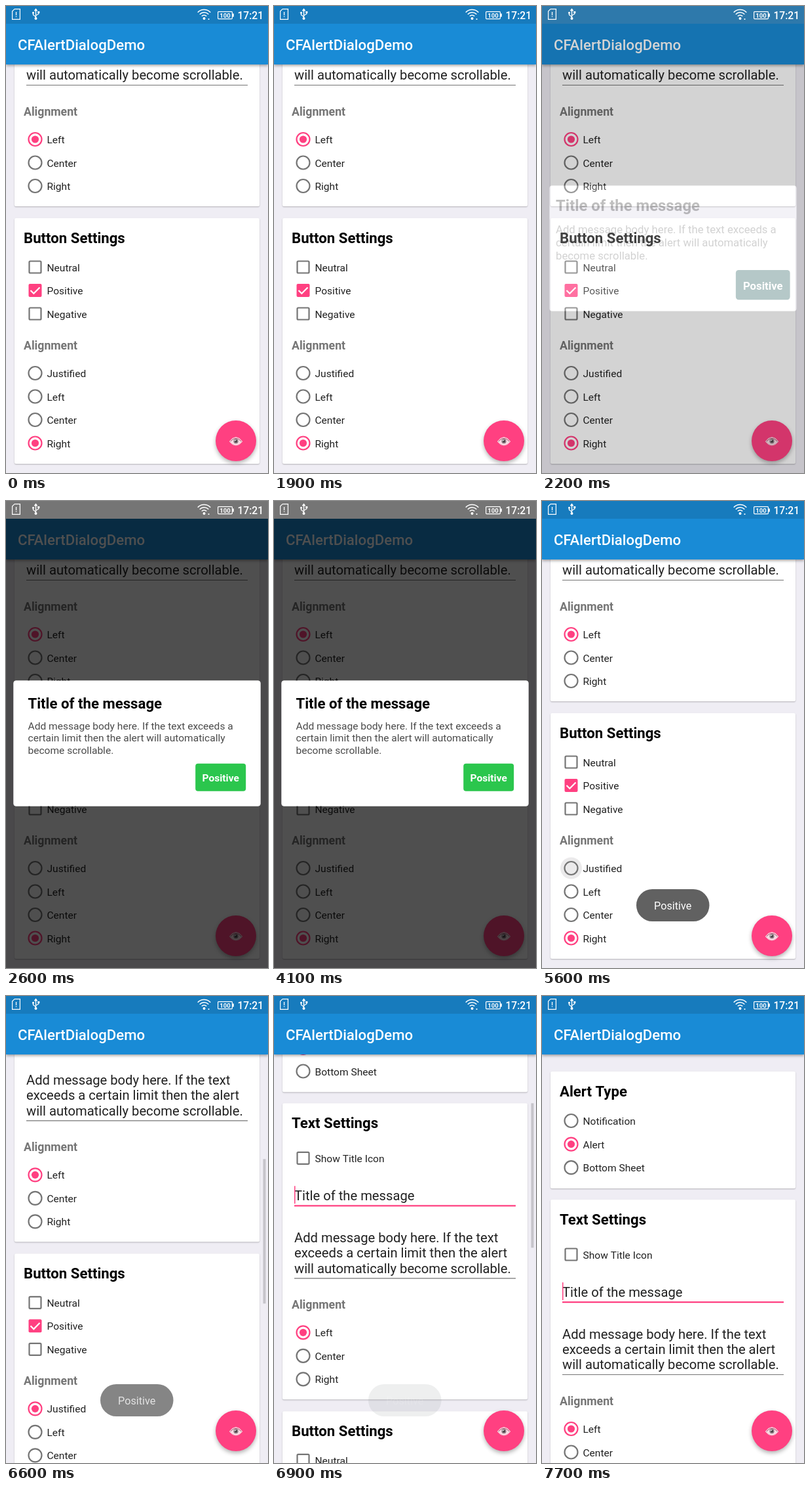
Write an HTML page with a canvas that moves like this. It is 400 px wide and 711 px high and loops after 8000 ms.

```html
<!DOCTYPE html>
<html lang="en">
<head>
<meta charset="utf-8">
<title>Alert dialog demo</title>
<style>
html, body { margin: 0; width: 100%; height: 100%; overflow: hidden; background: #efedf4; }
canvas { display: block; width: 400px; height: 711px; }
</style>
</head>
<body>
<canvas id="stage"></canvas>
<script>
const W = 400, H = 711, LOOP = 8000, BAR = 89;
const PINK = '#ff4081', GREY = '#757575', INK = '#212121', BG = '#efedf4';
const canvas = document.getElementById('stage');
const ctx = canvas.getContext('2d');
const dpr = window.devicePixelRatio || 1;
canvas.width = W * dpr;
canvas.height = H * dpr;

const clamp = x => Math.max(0, Math.min(1, x));
const span = (t, from, to) => clamp((t - from) / (to - from));
const ease = u => (1 - Math.cos(Math.PI * u)) / 2;
const smooth = u => u * u * (3 - 2 * u);
const mix = (a, b, u) => `rgb(${a.map((v, i) => Math.round(v + (b[i] - v) * u)).join()})`;

function text(str, x, mid, size, weight = 400, color = INK, align = 'left') {
  ctx.font = `${weight} ${size}px Roboto, sans-serif`;
  ctx.fillStyle = color;
  ctx.textAlign = align;
  ctx.fillText(str, x, mid + size * 0.355);
}

function box(x, y, w, h, r, color) {
  ctx.beginPath();
  ctx.roundRect(x, y, w, h, r);
  ctx.fillStyle = color;
  ctx.fill();
}

function disc(x, y, r, color) {
  ctx.beginPath();
  ctx.arc(x, y, r, 0, 2 * Math.PI);
  ctx.fillStyle = color;
  ctx.fill();
}

function line(color, width, ...pts) {
  ctx.beginPath();
  for (let i = 0; i < pts.length; i += 2) ctx.lineTo(pts[i], pts[i + 1]);
  ctx.strokeStyle = color;
  ctx.lineWidth = width;
  ctx.stroke();
}

function shadow(color, blur, dy, draw) {
  ctx.save();
  ctx.shadowColor = color;
  ctx.shadowBlur = blur * dpr;
  ctx.shadowOffsetY = dy * dpr;
  draw();
  ctx.restore();
}

function card(top, bottom, title) {
  shadow('rgba(0,0,0,.25)', 2, 1, () => box(13, top, 374, bottom - top, 2, '#fff'));
  text(title, 27, top + 30, 22.2, 700, '#000');
}

function radio(label, y, on) {
  ctx.beginPath();
  ctx.arc(44.5, y, 10, 0, 2 * Math.PI);
  ctx.strokeStyle = on > 0.5 ? PINK : GREY;
  ctx.lineWidth = 2.2;
  ctx.stroke();
  if (on) disc(44.5, y, 5.6 * on, PINK);
  text(label, 62.5, y + 0.5, 15.55);
}

function check(label, y, on) {
  if (on) {
    box(34.5, y - 10, 20, 20, 2, PINK);
    line('#fff', 2.2, 37.5, y, 42.3, y + 4.8, 51.5, y - 4.6);
  } else {
    ctx.beginPath();
    ctx.roundRect(35.5, y - 9, 18, 18, 1.5);
    ctx.strokeStyle = GREY;
    ctx.lineWidth = 2.2;
    ctx.stroke();
  }
  text(label, 62.5, y + 0.5, 15.55);
}

function page(t) {
  const scroll = 456 * (1 - smooth(span(t, 6404, 7204)));
  const picked = span(t, 5700, 5900);

  ctx.save();
  ctx.translate(0, -scroll);

  card(115, 293, 'Alert Type');
  ['Notification', 'Alert', 'Bottom Sheet'].forEach((s, i) => radio(s, 190 + 35.6 * i, +(i === 1)));

  card(310, 761, 'Text Settings');
  check('Show Title Icon', 393.5, false);
  text('Title of the message', 31, 450.5, 20.2);
  box(31, 436, 1.5, 27, 0, PINK);
  box(31, 465, 338, 2.2, 0, PINK);
  ['Add message body here. If the text',
   'exceeds a certain limit then the alert',
   'will automatically become scrollable.'].forEach((s, i) => text(s, 31, 514.5 + 23.4 * i, 20.2));
  box(31, 576, 338, 1.1, 0, GREY);
  text('Alignment', 27, 616.5, 17.7, 700, GREY);
  ['Left', 'Center', 'Right'].forEach((s, i) => radio(s, 659 + 35.5 * i, +(i === 0)));

  card(779, 1153, 'Button Settings');
  ['Neutral', 'Positive', 'Negative'].forEach((s, i) => check(s, 853.5 + 35.5 * i, i === 1));
  text('Alignment', 27, 972.5, 17.7, 700, GREY);
  const ripple = span(t, 5550, 5600) * (1 - span(t, 5750, 6100));
  if (ripple) disc(44.5, 1015, 16.5, `rgba(60,50,60,${0.1 * ripple})`);
  ['Justified', 'Left', 'Center', 'Right'].forEach((s, i) =>
    radio(s, 1015 + 35.5 * i, i === 0 ? picked : i === 3 ? 1 - picked : 0));
  ctx.restore();

  const thumb = span(t, 6400, 6480) * (1 - span(t, 7450, 7700));
  if (thumb) box(392.5, BAR + (scroll + 63) * 0.354, 4, 220, 0, `rgba(120,118,124,${0.35 * thumb})`);
}

function eye(x, y) {
  ctx.beginPath();
  ctx.moveTo(x - 10, y);
  ctx.quadraticCurveTo(x, y - 13, x + 10, y);
  ctx.quadraticCurveTo(x, y + 12, x - 10, y);
  ctx.fillStyle = '#f9dbe4';
  ctx.fill();
  ctx.strokeStyle = '#f7b3c8';
  ctx.lineWidth = 1;
  ctx.stroke();
  ctx.beginPath();
  ctx.moveTo(x - 8.5, y);
  ctx.quadraticCurveTo(x, y - 9.5, x + 8.5, y);
  ctx.strokeStyle = '#a8506c';
  ctx.stroke();
  disc(x, y - 0.3, 3.6, '#8d7f86');
  disc(x, y - 0.3, 1.8, '#3d3238');
  disc(x - 1.2, y - 1.6, 0.9, '#fff');
}

function appBar() {
  shadow('rgba(0,0,0,.35)', 4, 2, () => box(0, 27, W, BAR - 27, 0, '#198bd6'));
  text('CFAlertDialogDemo', 18, 59.5, 22.2, 500, '#fff');
}

function statusBar(grey) {
  box(0, 0, W, 27, 0, '#177bbd');
  ctx.globalAlpha = grey;
  box(0, 0, W, 27, 0, GREY);
  ctx.globalAlpha = 1;
  const c = '#fff';
  // memory card
  line(c, 1.2, 13, 4.6, 21.4, 4.6, 21.4, 20.4, 9.6, 20.4, 9.6, 8, 13, 4.6);
  box(14.9, 9, 1.3, 5, 0, c);
  box(14.9, 15.3, 1.3, 1.4, 0, c);
  // plug
  line(c, 1.4, 45.5, 6, 45.5, 19);
  line(c, 1.3, 45.5, 16.5, 41.5, 13.5, 41.5, 10.5);
  line(c, 1.3, 45.5, 14.5, 49.8, 12, 49.8, 9.5);
  line(c, 1.6, 43.5, 7.5, 45.5, 4.8, 47.5, 7.5);
  disc(45.5, 19, 2, c);
  disc(41.5, 10.3, 1.5, c);
  box(48.3, 8, 3, 3, 0, c);
  // wireless
  for (const r of [5, 9.2, 13.4]) {
    ctx.beginPath();
    ctx.arc(302.5, 19, r, -Math.PI * 0.76, -Math.PI * 0.24);
    ctx.strokeStyle = c;
    ctx.lineWidth = 1.5;
    ctx.stroke();
  }
  disc(302.5, 19, 2, c);
  disc(309.5, 20, 1.1, c);
  // battery
  ctx.beginPath();
  ctx.roundRect(323.6, 8.6, 21.8, 11, 1);
  ctx.lineWidth = 1.2;
  ctx.stroke();
  box(346, 11.5, 1.8, 5, 0, c);
  text('100', 334.5, 14.2, 9.5, 700, c, 'center');
  text('17:21', 393, 14.2, 15.6, 500, c, 'right');
}

function dialog(a, scale, press) {
  ctx.save();
  ctx.globalAlpha = a;
  ctx.beginPath();
  ctx.rect(0, 27, W, H - 27);
  ctx.roundRect(11.5, 273.5, 377, 191, 4);
  ctx.fillStyle = 'rgba(0,0,0,.69)';
  ctx.fill('evenodd');
  box(11.5, 273.5, 377, 191, 4, '#fff');
  ctx.clip();

  ctx.translate(200, 369);
  ctx.scale(scale, scale);
  ctx.translate(-200, -369);
  text('Title of the message', 33.5, 308.5, 22.2, 700, '#000');
  ['Add message body here. If the text exceeds a',
   'certain limit then the alert will automatically',
   'become scrollable.'].forEach((s, i) => text(s, 33.5, 342.5 + 18.3 * i, 15.55, 400, '#4a4a4a'));

  // the button turns opaque ahead of the card
  ctx.translate(327.7, 420.7);
  ctx.scale(press, press);
  ctx.globalAlpha = Math.sqrt(a);
  box(-38.5, -21, 77, 42, 4, mix([115, 141, 151], [43, 198, 77], clamp((a - 0.2) / 0.6)));
  ctx.globalAlpha = clamp(a * 4);
  text('Positive', 0, 1, 15.55, 700, '#fff', 'center');
  ctx.restore();
}

function toast(a) {
  ctx.globalAlpha = a;
  box(144, 591, 111.5, 49, 24.5, mix([145, 155, 158], [97, 97, 97], clamp(a * 1.3)));
  text('Positive', 199.7, 616.5, 16.2, 400, '#fff', 'center');
  ctx.globalAlpha = 1;
}

function draw(t) {
  ctx.setTransform(dpr, 0, 0, dpr, 0, 0);
  box(0, 0, W, H, 0, BG);
  page(t);
  shadow('rgba(0,0,0,.3)', 6, 3, () => disc(351, 662, 31, PINK));
  eye(351, 663);
  appBar();

  const enter = ease(span(t, 2000, 2600));
  const leave = ease(span(t, 4290, 4890));
  const alpha = enter * (1 - leave);
  statusBar(alpha);
  if (alpha > 0) dialog(alpha, 1.1 - 0.1 * enter, 1 - 0.1 * span(t, 4100, 4250));

  const shown = span(t, 4350, 4850) * (1 - span(t, 6490, 6970));
  if (shown > 0) toast(shown);
}

const start = performance.now();
function tick() {
  draw((performance.now() - start) % LOOP);
  requestAnimationFrame(tick);
}
tick();
</script>
</body>
</html>
```
